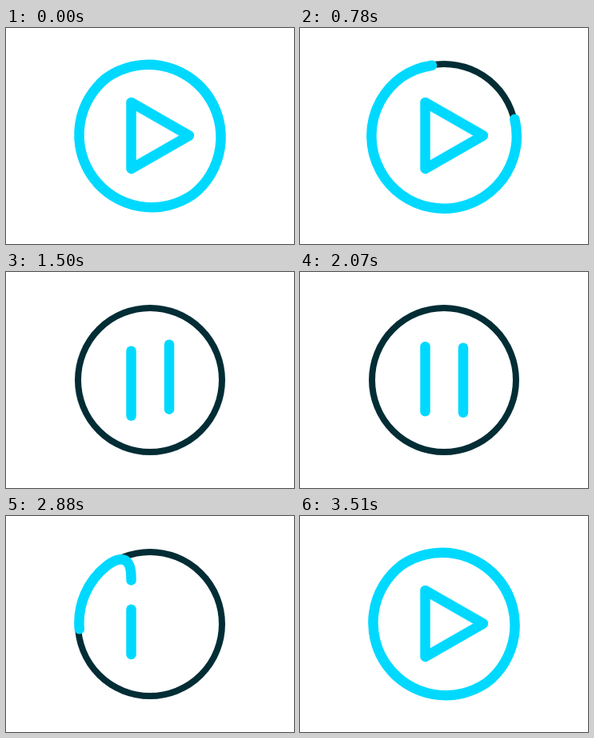
An HTML page that plays this animation: 360 by 270 pixels, repeating every 4470 ms.

```html
<!DOCTYPE html>
<html lang="en">
<head>
<meta charset="utf-8">
<title>Play and pause</title>
<style>
  html, body { margin: 0; width: 100%; height: 100%; overflow: hidden; background: #fff; }
  svg { display: block; width: 360px; height: 270px; }
  path, circle { fill: none; stroke: #00d9ff; stroke-width: 12.5; stroke-linecap: round; stroke-linejoin: round; }
  circle { stroke: #022d35; stroke-width: 8; }
</style>
</head>
<body>
<svg viewBox="0 0 360 270">
  <circle cx="180" cy="135" r="90"/>
  <path id="ringIn"/>
  <path id="ringOut"/>
  <path id="icon" d="M204 70V186A23.75 23.75 0 0 1 156.5 186V93L229 134.5L156.5 176V93"/>
</svg>
<script>
const LOOP = 4470, STEP = 30, TURN = 1905, LEAVE = 2600;
const R = 90.75, AROUND = 2 * Math.PI * R;
const [ringIn, ringOut, icon] = ['ringIn', 'ringOut', 'icon'].map(id => document.getElementById(id));

// The ring spirals into the left bar, then leaves the bar by its own curl.
const arc = `A${R} ${R} 0 `;
const fullTurn = `${arc}0 0 233.3 208.4${arc}0 0 126.7 61.6`;
ringIn.setAttribute('d', `M126.7 61.6${fullTurn}${arc}1 0 180 44.25C168 44.25 156.5 58 156.5 75V190`);
ringOut.setAttribute('d', `M156.5 190V78C156.5 50 143 50 126.7 61.6${fullTurn}`);
const inLength = ringIn.getTotalLength(), outLength = ringOut.getTotalLength();

// Cubic ease with inner control values a and b.
function ease(t, start, duration, a = 0, b = 1) {
  const u = Math.min(1, Math.max(0, (t - start) / duration)), w = 1 - u;
  return 3 * u * w * w * a + 3 * u * u * w * b + u * u * u;
}

const mix = (from, to, k) => from + (to - from) * k;

// The bars swing a little past their rest and settle.
function swing(t) {
  const s = Math.max(0, t - 1200);
  return 7 * Math.sin(s / 191) * Math.exp(-s / 400);
}

function trim(path, from, to) {
  path.style.strokeDasharray = `${to - from} 5000`;
  path.style.strokeDashoffset = -from;
}

function draw(t) {
  const leaving = t >= TURN, sway = swing(t);
  const open = ease(t, LEAVE, 440);
  ringIn.style.display = leaving ? 'none' : '';
  ringOut.style.display = leaving ? '' : 'none';
  if (leaving) {
    trim(ringOut,
      mix(15, outLength - AROUND, open) - sway,
      mix(96, outLength, ease(t, LEAVE, 860)) - sway);
    trim(icon,
      mix(24, 280, open) - sway,
      mix(105, 533.6, ease(t, LEAVE, 690)) - sway);
  } else {
    trim(ringIn,
      mix(0, inLength - 96, ease(t, 300, 1020)) + sway,
      mix(AROUND, inLength - 15, ease(t, 300, 1200, 0.684, 0.797)) + sway);
    trim(icon,
      mix(280, 24, ease(t, 600, 900, 0.35, 0.65)) - sway,
      mix(533.6, 105, ease(t, 620, 780)) - sway);
  }
}

const start = performance.now();
function tick() {
  const t = (performance.now() - start) % LOOP;
  draw(Math.floor(t / STEP) * STEP);
  requestAnimationFrame(tick);
}
tick();
</script>
</body>
</html>
```
